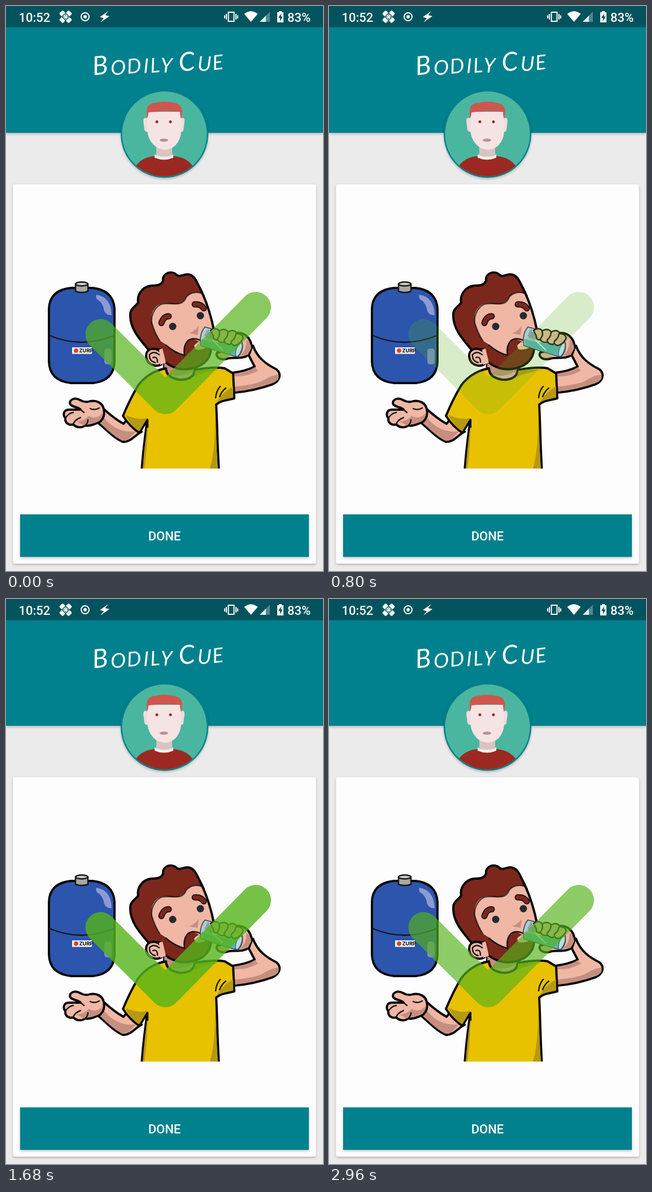
Recreate the animation shown at these times as an HTML page. Size 561 by 998 pixels, loop 3 s.

```html
<!DOCTYPE html>
<html lang="en">
<head>
<meta charset="utf-8">
<title>Reminder</title>
<style>
  html, body { margin: 0; width: 100%; height: 100%; overflow: hidden; background: #ebebec; }
  svg { display: block; width: 100%; height: 100%; }
  text { font-family: Roboto, sans-serif; font-size: 22px; font-weight: 500; fill: #fff; }
  .title { font: italic 400 36px Lato, sans-serif; letter-spacing: 3px; }
  .title .cap { font-size: 46px; }
  .brand { font: 800 9px Inter, sans-serif; fill: #222; }
  .white { fill: #fff; }
  .white-line { fill: none; stroke: #fff; stroke-width: 2; }
  .ink { stroke: #080808; stroke-width: 4; stroke-linejoin: round; stroke-linecap: round; }
  .thin { stroke: #151515; stroke-width: 2.4; stroke-linejoin: round; stroke-linecap: round; }
  .none { fill: none; }
  .skin { fill: #f0b7a5; }
  .shade { fill: #c58f80; }
  .hair { fill: #7b271c; }
  .shirt { fill: #e8c100; }
  .fold { fill: #b59814; }
  .check {
    fill: none; stroke: #55b41a; stroke-width: 54;
    stroke-linecap: round; stroke-linejoin: round;
    animation: appear 1500ms linear -1030ms infinite;
  }
  @keyframes appear { from { opacity: 0; } to { opacity: 1; } }
</style>
</head>
<body>
<svg viewBox="0 0 561 998" preserveAspectRatio="none">
  <defs>
    <filter id="shadow" x="-10%" y="-10%" width="120%" height="120%">
      <feDropShadow dx="0" dy="2" stdDeviation="2" flood-color="#000" flood-opacity=".25"/>
    </filter>
    <clipPath id="portrait"><circle cx="280.5" cy="226" r="75"/></clipPath>
    <clipPath id="ground"><path d="M60 460H500V817H60Z"/></clipPath>
  </defs>

  <rect width="561" height="998" fill="#ebebec"/>
  <rect y="37" width="561" height="187" fill="#00818d" filter="url(#shadow)"/>
  <rect width="561" height="37.5" fill="#02535e"/>

  <g id="status">
    <text x="22.5" y="27.5">10:52</text>
    <text x="498" y="27.5">83%</text>
    <g transform="translate(105.5 19)">
      <rect class="white" x="-12" y="-4.5" width="24" height="9" rx="2" transform="rotate(45)"/>
      <rect class="white" x="-12" y="-4.5" width="24" height="9" rx="2" transform="rotate(-45)"/>
      <path d="M-6.4 0L0-6.4 6.4 0 0 6.4Z" fill="none" stroke="#02535e" stroke-width="1.4"/>
      <path d="M-3 0h0M3 0h0M0-3h0M0 3h0" stroke="#02535e" stroke-width="2" stroke-linecap="round"/>
    </g>
    <circle class="white-line" cx="140" cy="19" r="7"/>
    <circle class="white" cx="140" cy="19" r="3"/>
    <path class="white" d="M181 9L166 19.500 173 21.500 167 29 183 18 175.500 16Z"/>
    <path class="white-line" d="M393.500 11H403.500V27H393.500ZM390 14V24M387 16.500V22M407 14V24M410 16.500V22"/>
    <path class="white" d="M421.500 14Q433.500 4.500 445.500 14L433.500 28Z"/>
    <path class="white" opacity=".3" d="M467 10V28H449Z"/>
    <path class="white" opacity=".85" d="M460 17V28H449Z"/>
    <path class="white" d="M483 9H488V11H491V29H480V11H483Z"/>
    <path d="M487 13L482 21H485V27L489.500 18.500H486.500Z" fill="#02535e"/>
  </g>

  <text class="title" x="154" y="117" transform="rotate(-2.500 280 110)" rotate="-4 3 -3 2 -2 4 0 -3 3 -4"><tspan class="cap">B</tspan>ODILY <tspan class="cap">C</tspan>UE</text>

  <g id="avatar">
    <circle cx="280.5" cy="226" r="77.500" fill="#00818d" filter="url(#shadow)"/>
    <circle cx="280.5" cy="226" r="75" fill="#4ab6a0"/>
    <g clip-path="url(#portrait)">
      <path d="M222 306Q226 269 263 265H297Q334 269 339 306Z" fill="#9b2921"/>
      <path d="M263 262Q280 269 296 262V268Q280 275 263 268Z" fill="#f5f0ee"/>
      <path d="M266 244H294V264Q280 269 266 264Z" fill="#d8c5c2"/>
      <path d="M251 198Q243 196 243 203L245 219Q247 223 251 222M309 198Q316 196 316 203L314 219Q313 223 309 222" fill="#f0dcdc"/>
      <path d="M250 187H310V222Q309 236 300 246Q291 254 280 254Q264 252 257 240Q250 230 250 216Z" fill="#f6e3e3"/>
      <path d="M249 199V184Q250 172 264 171Q280 167 297 171Q311 173 312 186L310 200Q308 195 308 187Q281 184 252 188Q252 195 249 199Z" fill="#cf564e"/>
      <g fill="#8b3327"><circle cx="267" cy="204.500" r="2.500"/><circle cx="291" cy="204.500" r="2.500"/></g>
      <ellipse cx="279.500" cy="237" rx="7.500" ry="2.700" fill="#b3938f"/>
    </g>
  </g>

  <rect x="12.500" y="315" width="536" height="670" rx="3" fill="#fefdfd" filter="url(#shadow)"/>

  <g id="tank">
    <path class="ink" fill="#2c55ad" d="M76 535Q77 502 115 498H153Q190 502 192 535V628Q191 662 154 666H115Q77 662 76 628Z"/>
    <path class="thin none" d="M77 582Q134 606 191 582"/>
    <path class="thin" fill="#a8a9a2" d="M123 491V504Q134 508 145 504V491"/>
    <ellipse class="thin" cx="134" cy="491" rx="11" ry="3.500" fill="#c9c9c3"/>
    <path fill="#8e99d4" d="M160 510Q186 514 187 546Q178 547 174 539Q172 524 161 518Q158 513 160 510Z"/>
    <rect x="174" y="605" width="13" height="28" rx="5" fill="#7f8dcd"/>
    <rect x="117" y="603" width="35" height="11.500" fill="#f6f6f6"/>
    <circle cx="124" cy="608.700" r="4" fill="#d9452f"/>
    <text class="brand" x="129.500" y="612">ZURP</text>
  </g>

  <g id="man" clip-path="url(#ground)">
    <g id="open-arm">
      <path class="ink skin" d="M172 711C184 722 197 732 208 738L216 728 240 752C228 758 220 771 207 770C190 763 176 746 160 734Z"/>
      <path class="shade" d="M162 733L174 728C186 742 204 755 231 751C221 760 216 769 207 768C192 762 177 746 162 733Z"/>
      <path class="ink skin" d="M173 712C171 701 160 696 149 698C141 701 136 699 131 696C120 690 110 697 114 704C119 709 127 708 132 713L113 713C102 712 100 722 105 728C104 738 113 741 119 739C126 746 135 745 140 741C150 743 160 737 167 734Q176 725 173 712Z"/>
      <path class="shade" d="M125 734Q140 732 146 724Q160 732 172 718Q170 733 158 736L138 741Z"/>
      <path class="thin none" d="M105 728Q111 719 119 718M119 739Q121 731 132 727M132 713L138 718M149 711Q157 715 165 710M140 741Q145 737 145 731"/>
    </g>

    <g id="raised-arm">
      <path class="ink skin" d="M400 648C416 646 430 642 440 637L427 612 437 600C445 622 461 633 479 642C488 650 485 662 472 668C450 676 425 681 403 683Z"/>
      <path class="shade" d="M405 672Q445 669 459 659Q471 652 482 651Q485 661 472 666Q438 678 405 681ZM404 650Q428 647 440 638L446 644Q428 655 404 654Z"/>
    </g>

    <path class="shade thin" d="M279 628H337V666H279Z"/>
    <path class="skin" d="M281 647Q302 660 330 646V664H288Z"/>
    <path class="ink shirt" d="M283 640C262 644 246 654 234 670Q220 693 207 724Q219 743 236 754L250 731C246 760 242 790 240 823H377C374 780 374 740 372 704C381 696 391 697 404 693L402 649 387 640C370 637 350 640 334 643C333 656 321 661 306 660C291 657 284 652 283 640Z"/>
    <path class="fold" d="M211 722Q231 732 250 728L236 751Q221 742 211 722ZM251 735Q250 780 245 817H242Q245 775 251 735ZM370 706Q371 760 375 817H361Q372 780 370 706ZM373 700Q383 682 402 672V691Q383 695 373 700ZM335 644Q360 641 375 643Q350 647 333 655Z"/>
    <path class="thin none" d="M251 731V744M371 692Q372 680 379 672M378 690Q382 680 389 675M283 640Q284 657 306 660Q331 661 334 643"/>

    <g id="head">
      <path class="ink hair" d="M252 607C238 590 219 570 220 546C219 535 229 531 234 524C231 509 242 496 257 494C268 494 275 493 278 485C276 472 293 466 302 475C308 480 313 473 322 474C335 476 337 487 343 498C351 514 360 538 368 573L362 612Q359 626 344 635Q323 645 303 640Q287 635 280 627L273 606Z"/>
      <path class="skin" d="M258 545C262 530 274 522 288 526C302 529 313 525 319 514C329 503 345 504 351 512Q361 535 367 571L348 598Q331 583 321 592C315 601 313 609 316 617C304 613 291 607 283 598L272 591C263 575 256 562 258 545Z"/>
      <path class="thin none" d="M258 560C256 550 261 534 274 527C292 521 311 535 319 514C329 503 345 504 351 512M272 591Q264 579 258 560" stroke-opacity=".75"/>
      <path class="ink none" d="M343 498Q360 532 368 573"/>
      <path class="none thin" d="M283 599Q299 613 316 617Q313 600 322 591Q331 584 347 592"/>
      <path fill="#f5c5b4" d="M333 600Q341 590 352 593L357 602Q345 609 335 606Z"/>
      <path class="shade" d="M324 578Q335 574 341 565L339 581Z"/>
      <circle cx="295" cy="566" r="6.500" fill="#252a2f"/><circle cx="344" cy="547" r="6.500" fill="#252a2f"/>
      <g fill="none" stroke-linecap="round">
        <path stroke="#151010" stroke-width="11" d="M275 560Q279 548 288 548M334 527Q345 526 350 534"/>
        <path stroke="#7b271c" stroke-width="7.500" d="M275 560Q279 548 288 548M334 527Q345 526 350 534"/>
      </g>
      <path class="ink skin" stroke-width="3" d="M275 612C263 601 247 605 248 619C249 633 264 639 275 633Z"/>
      <path class="skin" d="M271 607L277 605 283 630 273 634Z"/>
      <path class="thin none" d="M271 616Q261 608 254 616Q253 627 264 630M260 621Q268 618 268 629"/>
    </g>

    <g id="drink">
      <path class="ink skin" d="M405 578C422 575 433 586 435 602L430 616C418 625 403 619 391 623C378 627 369 618 374 612L400 605Z"/>
      <path class="shade" d="M413 618Q427 608 425 589Q434 596 434 605L428 616Z"/>
      <path d="M352 567Q385 574 418 594Q421 610 410 620Q378 611 345 600Q341 580 352 567Z" fill="#a9cdd5" fill-opacity=".94" stroke="#33474f" stroke-width="1.600"/>
      <path d="M346 588Q370 597 416 597Q418 610 409 618Q378 611 348 600Z" fill="#55b5bd"/>
      <path d="M357 571Q371 577 369 589Q355 588 351 582" fill="#8e9fac"/>
      <path d="M365 590L384 608M360 574Q374 580 371 594" fill="none" stroke="#e4f2f3" stroke-width="2"/>
      <ellipse cx="412" cy="607" rx="4.500" ry="12.500" transform="rotate(20 412 607)" fill="#b8dde0" stroke="#42656d" stroke-width="1.300"/>
      <path class="thin skin" d="M362 573Q371 567 377 573Q380 581 375 590Q366 590 367 583Z"/>
      <path class="thin skin" d="M377 574Q386 568 393 575Q394 587 385 594Q376 595 374 588Q380 582 377 574Z"/>
      <path class="thin skin" d="M393 576Q402 570 408 577Q407 590 396 598Q386 597 386 590Q393 584 393 576Z"/>
      <path class="thin skin" d="M407 579Q417 578 420 586Q416 596 405 600Q397 598 399 592Q406 587 407 579Z"/>
    </g>
  </g>

  <path class="check" d="M167.500 580L282 694 442 532"/>

  <rect x="25" y="898" width="511" height="75" fill="#00818d" filter="url(#shadow)"/>
  <text x="280.500" y="944" text-anchor="middle">DONE</text>
</svg>
</body>
</html>
```
